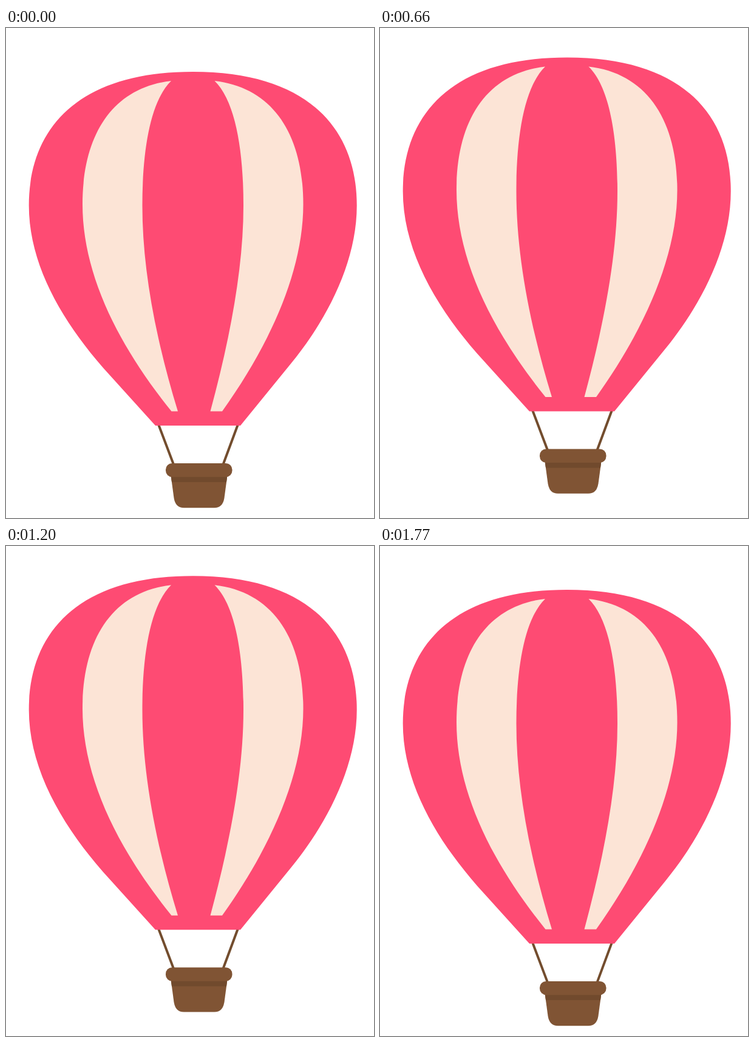
An HTML page for the animation above (1.8 s loop, 606x806 px).

```html
<!DOCTYPE html>
<html lang="en">
<head>
<meta charset="utf-8">
<title>Hot air balloon</title>
<style>
  html, body { margin: 0; width: 100%; height: 100%; overflow: hidden; background: #fff; }
  svg { display: block; width: 606px; height: 806px; }
</style>
</head>
<body>
<svg viewBox="0 0 606 806">
  <g id="balloon">
    <path d="M251 652L276 718M382 652L357.5 718" stroke="#734d2e" stroke-width="4"/>
    <path fill="#fe4b73" d="M308 72C118 72 37.7 166 37.7 292C37.7 388 91 480 160 559
      L246 654H386L470 551C528 480 577.7 386 577.7 292C577.7 166 498 72 308 72Z"/>
    <g fill="#fce4d6">
      <path d="M272 87C176 98 126 175 126 290C126 400 180 516 272.5 630.5
        H283C246 510 224.5 395 224.5 292C224.5 200 238 120 272 87Z"/>
      <path d="M343.5 87C439.5 98 489.5 175 489.5 290C489.5 400 435 520 356 630.5
        H336.5C369 510 391 395 391 292C391 200 377.5 120 343.5 87Z"/>
    </g>
    <path fill="#805434" d="M271.5 736H364.5L359.5 773Q357 789.3 343 789.3H293Q279 789.3 276.5 773Z"/>
    <path fill="#714a2d" d="M271.7 738H364.2L363 747H273Z"/>
    <rect x="263" y="716" width="109.5" height="22.5" rx="10.5" fill="#805434"/>
  </g>
</svg>
<script>
  const LOOP = 1800, PEAK = 930, STEP = 30, RISE = 29.5;
  const balloon = document.getElementById('balloon');
  const ease = p => p * p * (3 - 2 * p);
  const start = performance.now();

  function lift(t) {
    return RISE * (t < PEAK ? ease(t / PEAK) : ease((LOOP - t) / (LOOP - PEAK)));
  }

  function draw(now) {
    const t = Math.max(0, now - start) % LOOP;
    const held = Math.floor(t / STEP) * STEP;
    balloon.setAttribute('transform', `translate(0 ${-lift(held).toFixed(3)})`);
    requestAnimationFrame(draw);
  }
  draw(start);
</script>
</body>
</html>
```
